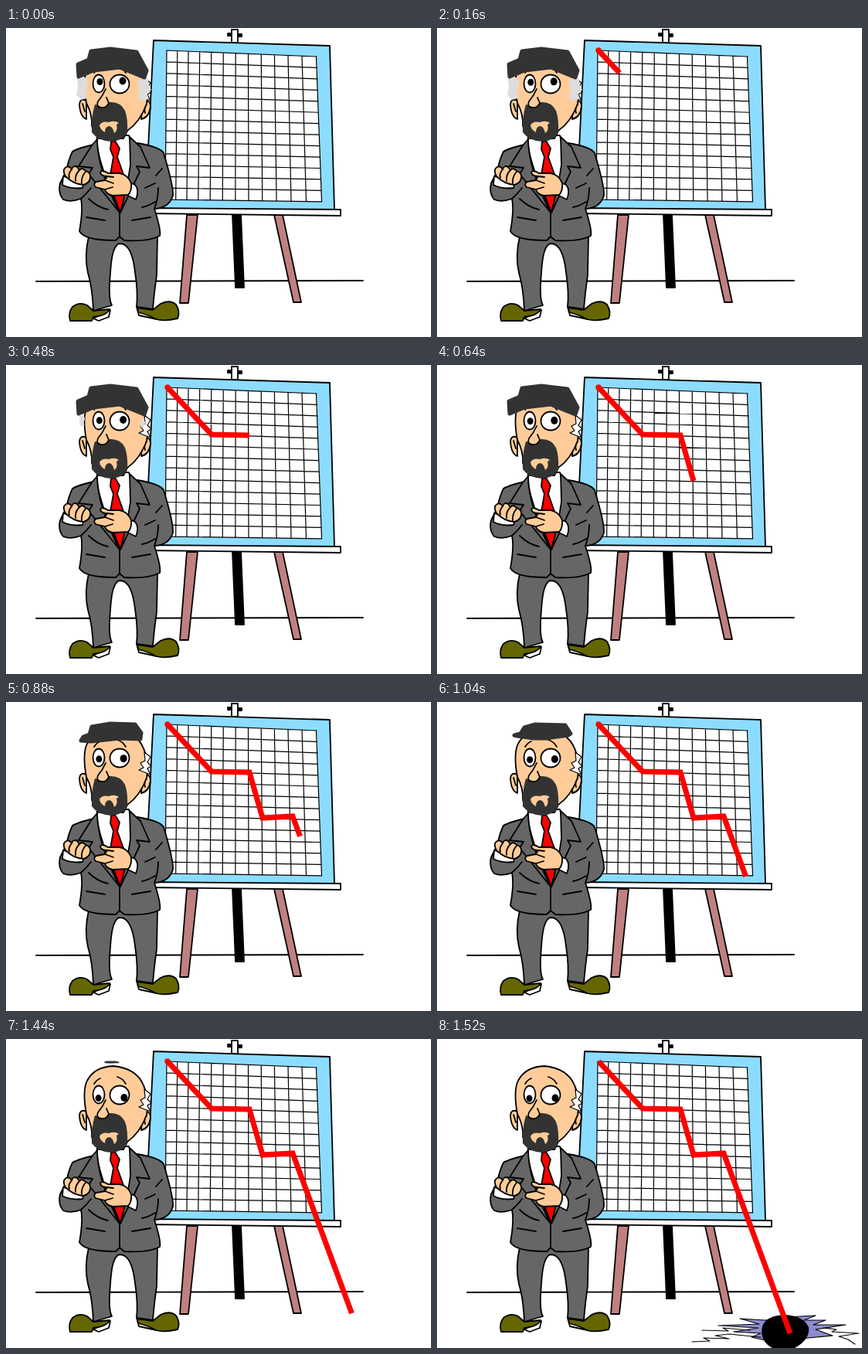
An HTML page for the animation above (2.4 s loop, 550 px wide and 400 px high).

```html
<!DOCTYPE html>
<html lang="en">
<head>
<meta charset="utf-8">
<title>Falling chart</title>
<style>
  html, body { margin: 0; width: 100%; height: 100%; overflow: hidden; background: #fff; }
  svg { display: block; width: 100vw; height: 100vh; }
  .ink { stroke: #000; stroke-width: 1.8; stroke-linejoin: round; stroke-linecap: round; }
  .thin { stroke-width: 1.2; }
  .plain { stroke: none; }
  .skin { fill: #fc9; }
  .suit { fill: #666; }
  .white { fill: #fff; }
  .shoe { fill: #660; }
  .leg { fill: #c08080; }
  .line { fill: none; }
  .dark { fill: #333; }
  .gray { fill: #ddd; }
</style>
</head>
<body>
<svg viewBox="0 0 550 400">
  <path class="ink" d="M39 328L462 327"/>

  <g class="ink">
    <path d="M293 241H304L308 336H297Z"/>
    <path class="leg" d="M234 242H248L236 356H225Z"/>
    <path class="leg" d="M347 242H358L382 355H372Z"/>
    <path class="white" d="M292 19V2H300V19Z"/>
    <path d="M287 7H291V10H287ZM301 8H305V11H301Z"/>
    <path fill="#8cdcff" d="M191 16L419 23L425 235H180Z"/>
    <path class="white plain" d="M208 29L402 37L408 225L206 222Z"/>
    <path id="grid" class="line thin"/>
    <path class="white" d="M180 233L433 235V243L180 240Z"/>
  </g>

  <g id="hole">
    <path class="ink thin" fill="#8c8cd0" d="M425 364L392 362L417 369L364 371L416 374L384 379L419 381L407 386L425 390L470 388L512 384L490 376L529 370L487 370L503 364L475 364L490 358L450 360Z"/>
    <path class="ink line thin" d="M405 377L370 374L377 378L343 377M419 386L378 382L360 384L378 388L345 387L353 391L330 392M500 374L517 376L511 379L546 381L520 385L532 389L541 395"/>
    <path d="M421 372Q426 358 450 357Q474 358 481 373Q483 389 463 400H434Q417 391 421 372Z"/>
  </g>
  <path id="chart" fill="none" stroke="red" stroke-width="7"/>
  <circle id="start" cx="209" cy="29" r="3.7" fill="red"/>

  <g class="ink">
    <path class="white" d="M113 376L135 365L133 374L120 379ZM169 361L193 372L195 377L172 372Z"/>
    <path class="shoe" d="M83 379Q80 369 86 361Q95 354 105 359L113 366L134 364Q131 372 113 374L111 379Z"/>
    <path class="shoe" d="M170 362L190 365L200 357Q212 351 220 358Q226 368 222 376Q205 380 194 377Q186 372 171 368Z"/>
    <path class="suit" d="M107 270Q101 295 106 317Q112 337 113 366L137 359Q132 350 135 318Q137 279 148 279Q163 280 167 316Q171 342 169 361L190 364Q192 340 195 320L196 270Z"/>
    <path class="suit" d="M118 150Q94 155 86 160Q81 170 78 185L70 201Q67 214 74 222Q84 226 97 221Q100 235 95 263Q101 275 142 275L147 270L153 275Q184 277 199 269Q201 262 192 234Q211 233 216 217Q217 205 204 162Q200 154 170 149Z"/>
    <path class="white" d="M118 139Q116 155 126 184L147 239L161 184Q166 162 159 139Z"/>
    <path fill="red" d="M136 147L141 146L147 156L144 167L154 195V217L148 239L137 211L135 190L139 167L135 157Z"/>
    <path class="suit" d="M118 144L111 152L94 179L112 181L107 189L147 239Q118 182 118 144ZM160 141L174 154L186 181L169 179L173 186L148 239Q157 206 161 177Z"/>
    <path class="line" d="M147 239V270M97 221Q104 215 110 207M192 234Q197 221 197 207M180 207L193 201M176 232Q183 231 193 225M78 186L92 179M202 182L194 191M107 221Q118 232 132 235M104 245L128 249M163 249L187 245"/>
    <path class="white" d="M74 192L73 203Q84 209 99 207L101 200Z"/>
    <path class="skin" d="M77 192Q72 183 78 180Q82 178 85 183Q87 177 92 180L95 184Q99 180 103 185Q110 187 109 194Q108 201 100 203Q87 202 77 192Z"/>
    <path class="line" d="M85 183Q80 189 82 194M95 184Q89 190 90 198M103 186Q97 193 98 201"/>
    <path class="white" d="M157 199L167 203Q173 210 168 222L158 217Z"/>
    <path class="skin" d="M122 187Q124 183 132 188L147 188Q158 190 162 201Q163 211 158 216L138 217Q129 215 128 209L116 206Q112 202 117 199L128 197L131 192Q123 192 122 187Z"/>
    <path class="line" d="M128 197L139 201M128 209L138 206M131 192L139 193"/>
    <path class="skin" d="M104 94Q96 90 95 99Q96 115 104 118ZM176 96Q187 91 187 102Q185 116 175 118Z"/>
    <path class="line" d="M99 98L102 108M182 99Q178 104 180 110"/>
    <path class="skin" d="M104 97Q99 70 104 56Q113 36 139 35Q169 38 178 60Q186 77 182 98Q174 121 157 133L152 143H120L111 127Q112 112 104 97Z"/>
    <path class="white thin" d="M179 65L187 71L183 78L188 83L183 86L187 94L172 88L178 85L174 79L180 76Z"/>
    <path class="line" d="M114 58Q117 53 122 51M144 49Q151 51 155 58"/>
    <ellipse class="white" cx="120" cy="72" rx="7.5" ry="11.5"/>
    <ellipse class="white" cx="147" cy="72.5" rx="12.5" ry="12"/>
    <ellipse id="leftPupil" class="plain" rx="4" ry="4.5"/>
    <ellipse id="rightPupil" class="plain" rx="4.5" ry="5"/>
    <path class="dark plain" d="M115 99L129 102L134 96Q148 95 154 107Q158 118 157 136Q151 146 136 147Q119 146 111 135Q110 116 115 99Z"/>
    <path class="skin plain" d="M121 126Q124 120 133 122Q141 119 146 123L143 125Q145 133 140 136Q138 127 133 127Q128 128 128 135Q122 132 121 126Z"/>
    <path class="skin" d="M129 79Q125 88 119 95Q116 102 123 103Q130 104 133 97L130 90"/>
  </g>

  <path id="leftGray" class="gray" d="M92 65L104 64L106 75L103 82L105 91L97 93L91 86L93 78Z"/>
  <path id="rightGray" class="gray" d="M171 68L184 65V73L188 80L183 85L184 92L175 95L170 88L173 82Z"/>
  <path id="hair" class="dark" stroke="#333" stroke-width="5" stroke-linejoin="round"/>
</svg>

<script>
const $ = id => document.getElementById(id);
const STEP = 80, LOOP = 2400, LAST = 19;
const mix = (a, b, f) => a + (b - a) * f;
const clamp = v => Math.max(0, Math.min(1, v));

// Slightly skewed grid with columns that widen to the right
let grid = '';
for (let i = 0; i < 13; i++)
  grid += `M${208 + 13.6 * i + .21 * i * i} ${29 + .65 * i}L${206 + 13.4 * i + .29 * i * i} ${222 + .25 * i}`;
for (let i = 0; i < 14; i++)
  grid += `M${208 - .15 * i} ${29 + 14.85 * i}L${402 + .48 * i} ${37 + 14.45 * i}`;
$('grid').setAttribute('d', grid);

// Each key: step, x, y
const chartKeys = [
  [0, 209, 29], [4.2, 266, 90], [6, 315, 91], [8, 332, 150], [10, 371, 148], [LAST, 457, 381]
];

// Each key: step, then outline points
const hairKeys = [
  [8, 94,63, 93,47, 107,41, 110,30, 135,27, 169,31, 182,55, 179,64, 147,51, 113,55],
  [11, 97,50, 100,45, 108,42, 111,32, 135,28, 167,29, 175,40, 174,48, 147,47, 110,51],
  [13, 104,44, 100,43, 108,41, 113,33, 127,29, 166,30, 173,41, 170,43, 141,47, 125,47],
  [16, 114,31, 110,30, 115,29, 121,28, 137,28, 150,28, 163,31, 150,31, 137,32, 125,32]
];

function sample(keys, step) {
  const end = keys.findIndex(k => k[0] >= step);
  const i = end < 0 ? keys.length - 1 : Math.max(1, end);
  const a = keys[i - 1], b = keys[i], f = clamp((step - a[0]) / (b[0] - a[0]));
  return a.slice(1).map((v, j) => mix(v, b[j + 1], f));
}

function show(id, on) { $(id).style.display = on ? '' : 'none'; }

function place(id, x, y) {
  $(id).setAttribute('cx', x);
  $(id).setAttribute('cy', y);
}

function shrink(id, x, y, s) {
  show(id, s > 0);
  $(id).setAttribute('transform', `translate(${x} ${y}) scale(${s}) translate(${-x} ${-y})`);
}

function draw(now) {
  const step = Math.min(LAST, Math.floor(now % LOOP / STEP));
  const corners = chartKeys.filter(k => k[0] < step).map(k => k.slice(1));
  $('chart').setAttribute('d', step ? 'M' + [...corners, sample(chartKeys, step)].join('L') : '');
  show('start', step > 0 && step < LAST);
  show('hole', step === LAST);

  const look = step / LAST;
  place('leftPupil', mix(121.5, 119.5, look), mix(69.5, 77, look));
  place('rightPupil', mix(151, 153, look), mix(68.5, 76.5, look));

  $('hair').setAttribute('d', `M${sample(hairKeys, step).join(' ')}Z`);
  shrink('hair', 137, 30, clamp((LAST - step) / 3));
  shrink('leftGray', 98, 66, clamp((8 - step) / 4));
  shrink('rightGray', 176, 72, clamp((8 - step) / 5));
}

function tick() {
  draw(performance.now());
  requestAnimationFrame(tick);
}
tick();
</script>
</body>
</html>
```
